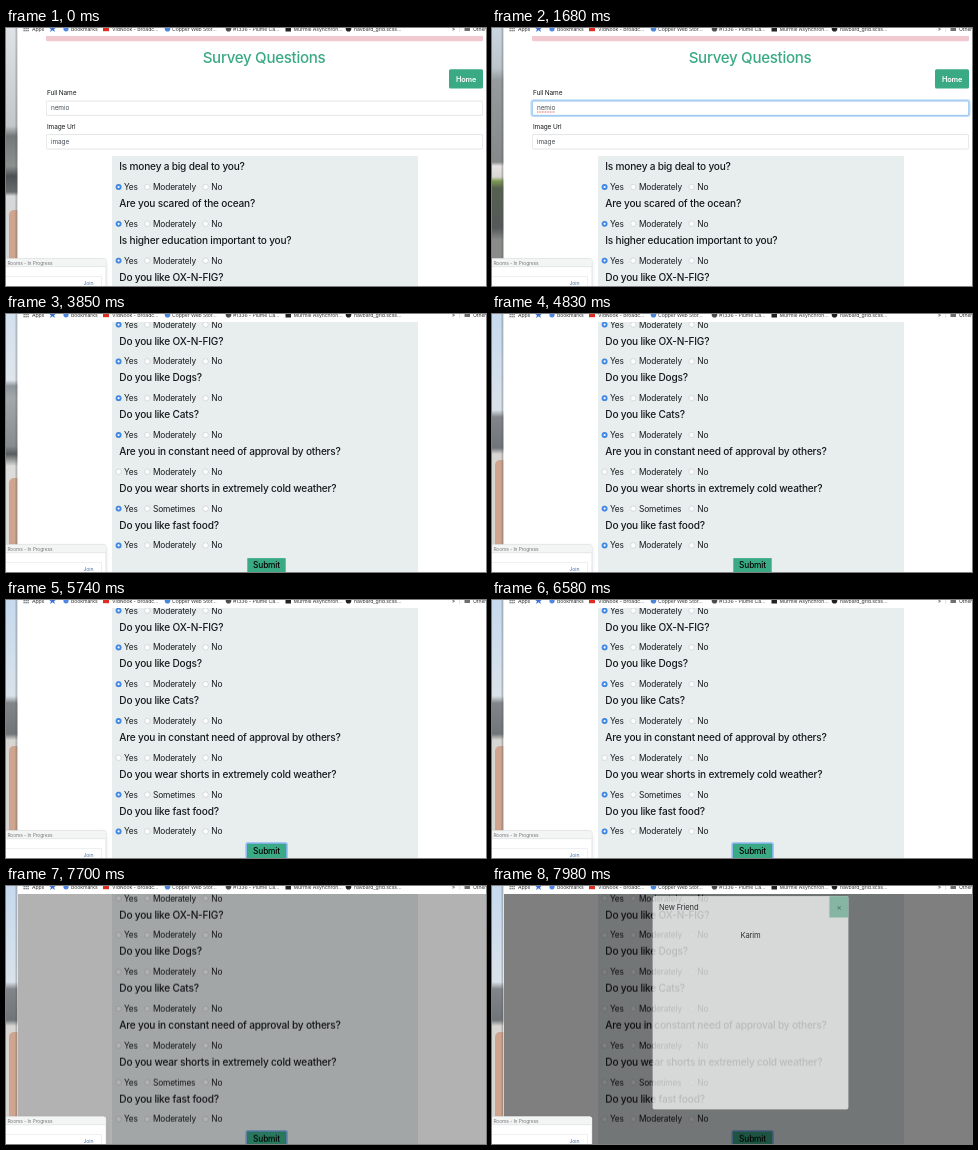
An HTML page for the animation above (8000 ms loop, 480x258 px).

```html
<!DOCTYPE html>
<html lang="en">
<head>
<meta charset="utf-8">
<title>Survey</title>
<style>
html, body { margin: 0; width: 100%; height: 100%; overflow: hidden; background: #fff; }
svg { display: block; width: 480px; height: 258px; font-family: Inter, "Liberation Sans", sans-serif; }
text { letter-spacing: -.02em; }
</style>
</head>
<body>
<svg id="stage" viewBox="0 0 480 258" xmlns="http://www.w3.org/2000/svg">
  <defs>
    <clipPath id="view"><rect x="11.5" y="8" width="469" height="250"/></clipPath>
    <filter id="soft" x="-20%" y="-60%" width="140%" height="220%"><feGaussianBlur stdDeviation="2.5"/></filter>
  </defs>
  <g id="desk"></g>
  <rect x="9.5" width="2" height="258" fill="#555" opacity=".3"/>
  <rect x="11.5" width="469" height="258" fill="#fff"/>
  <g id="bar"></g>
  <g clip-path="url(#view)">
    <g id="page"></g>
    <rect id="shade" x="11" y="8" width="470" height="250" fill="#000"/>
    <g id="modal"></g>
  </g>
  <g id="rooms"></g>
</svg>
<script>
const LOOP = 8000;
const GREEN = '#3aaa85';
const $ = id => document.getElementById(id);

function add(parent, tag, attrs, content) {
  const el = document.createElementNS('http://www.w3.org/2000/svg', tag);
  for (const k in attrs) el.setAttribute(k, attrs[k]);
  if (content) el.textContent = content;
  parent.appendChild(el);
  return el;
}
const group = parent => add(parent, 'g', {});
const rect = (parent, x, y, width, height, fill, more) =>
  add(parent, 'rect', { x, y, width, height, fill, ...more });
const dot = (parent, cx, cy, r, fill, more) =>
  add(parent, 'circle', { cx, cy, r, fill, ...more });
const text = (parent, x, y, size, str, more) =>
  add(parent, 'text', { x, y, 'font-size': size, fill: '#16191c', ...more }, str);

// steps: [time, value, easing to the next step]
function play(el, prop, steps) {
  const frames = steps.map(([t, v, easing = 'step-end']) =>
    ({ offset: t / LOOP, [prop]: v, easing }));
  frames.push({ offset: 1, [prop]: steps[steps.length - 1][1] });
  el.animate(frames, { duration: LOOP, iterations: Infinity });
}
const show = (el, from, to = LOOP) => play(el, 'opacity',
  [[0, from ? 0 : 1], ...(from ? [[from, 1]] : []), ...(to < LOOP ? [[to, 0]] : [])]);

// Strip of wallpaper: soft bands of colour and a plain figure.
function drawDesk() {
  const scenes = [
    { from: 0, to: 1120, body: 182,
      bands: [[0, '#dfe3e7'], [98, '#c3c7ca'], [108, '#747879'], [138, '#8c9190'], [148, '#4c5153'], [164, '#6a6d6e'], [168, '#d5d7d8']] },
    { from: 1120, to: 2240,
      bands: [[0, '#c9d5df'], [40, '#bcc5cc'], [52, '#969b9d'], [134, '#85898a'], [138, '#e6e4e3'], [149, '#d8d6d2'], [153, '#7d9a54'], [160, '#56604e'], [200, '#55595a'], [212, '#8a8c8a']] },
    { from: 2240, to: 4340, body: 164,
      bands: [[0, '#d3e0ee'], [66, '#dfe6ec'], [72, '#8f969b'], [84, '#a3a8ab'], [132, '#878c8e'], [140, '#565c5d'], [152, '#dcdcda']] },
    { from: 4340, to: LOOP, body: 146,
      bands: [[0, '#c6d9ee'], [96, '#d9e2ea'], [103, '#82868a'], [134, '#70757a'], [140, '#d8d6d3']] }
  ];
  scenes.forEach((s, i) => {
    const g = group($('desk'));
    const fade = add(g, 'linearGradient', { id: 'sky' + i, x2: 0, y2: 1 });
    s.bands.forEach(([y, c]) => add(fade, 'stop', { offset: y / 258, 'stop-color': c }));
    rect(g, 0, 0, 12, 258, `url(#sky${i})`);
    if (s.body) rect(g, 3, s.body, 12, 110, '#cfa58f', { rx: 5 });
    show(g, s.from, s.to);
  });
}

function drawBar() {
  const bar = $('bar');
  const label = (x, str) => text(bar, x, 2.7, 5.2, str, { fill: '#303336' });
  for (let i = 0; i < 9; i++)
    rect(bar, 17.5 + i % 3 * 2, -2 + Math.floor(i / 3) * 2, 1.3, 1.3, '#6b6f73');
  label(26, 'Apps');
  add(bar, 'path', { d: 'M46.5-3l1 2.6h2.7l-2.1 1.7 .8 2.6-2.4-1.6-2.4 1.6 .8-2.6-2.1-1.7h2.7z', fill: '#3f72d8' });
  dot(bar, 60, .8, 2.6, '#4e86e6');
  label(65, 'Bookmarks');
  rect(bar, 97, -1.8, 6, 5, '#e02b20');
  label(106, 'VidNook - Broadc…');
  dot(bar, 161.5, .8, 2.8, '#4a86d8');
  label(166, 'Copper Web Stor…');
  dot(bar, 222.5, .8, 2.8, '#4b4d50');
  label(227, '#1336 - Plume Ca…');
  rect(bar, 279.5, -2, 5.5, 5.5, '#222');
  label(287.5, 'Murmle Asynchron…');
  dot(bar, 342.5, .8, 2.8, '#1d1f21');
  label(348, 'navbard_grid.scss…');
  label(446, '»');
  rect(bar, 453.5, -2, .6, 6, '#d0d0d0');
  rect(bar, 458.5, -1, 5.5, 4, '#6b6f73', { rx: .6 });
  label(467, 'Other Bookmarks');
}

function drawField(page, y, label, value) {
  text(page, 41, y - 5.6, 6.5, label);
  rect(page, 40.3, y, 436.4, 14.4, '#fff', { rx: 1.5, stroke: '#ced4da', 'stroke-width': .6 });
  text(page, 45, y + 9.4, 6.5, value, { fill: '#495057' });
}

function drawRow(page, q, i) {
  const y = 138.8 + i * 36.8, mid = y + 20.2;
  text(page, 113.3, y + 3.4, 10.1, q, { 'font-weight': 500 });
  const middle = i === 7 ? 'Sometimes' : 'Moderately';
  [[112.6, 118, 'Yes'], [141.3, 147, middle], [199.6, 205.3, 'No']].forEach(([cx, x, str]) => {
    dot(page, cx, mid, 2.7, '#fff', { stroke: '#b9bdbf', 'stroke-width': .5 });
    text(page, x, mid + 2.9, 8.35, str);
  });
  if (i === 6) return;
  const on = group(page);
  dot(on, 112.6, mid, 2.9, '#3f87e5');
  dot(on, 112.6, mid, 1.1, '#fff');
  show(on, 0, 7490);
}

function drawPage() {
  const page = $('page');
  rect(page, 40, -6, 437, 19.2, '#f3c9d1', { rx: 1.5 });
  text(page, 258, 35.2, 15.1, 'Survey Questions',
    { fill: GREEN, 'font-weight': 500, 'text-anchor': 'middle' });
  rect(page, 443, 41.2, 34, 19.3, GREEN, { rx: 1.5 });
  text(page, 460, 53.5, 7.3, 'Home', { fill: '#fff', 'font-weight': 600, 'text-anchor': 'middle' });

  const glow = rect(page, 39.6, 72.4, 437.8, 15.6, 'none', { rx: 2.2, stroke: '#bfdcf7', 'stroke-width': 2.2 });
  drawField(page, 73, 'Full Name', 'nemio');
  drawField(page, 106.6, 'Image Url', 'image');
  const focus = group(page);
  rect(focus, 40.3, 73, 436.4, 14.4, 'none', { rx: 1.5, stroke: '#80bdf5', 'stroke-width': .7 });
  add(focus, 'path', { d: 'M45 84h18', stroke: '#d9534f', 'stroke-width': .9, 'stroke-dasharray': '1 .6' });
  show(glow, 1120);
  show(focus, 1120);

  rect(page, 106, 128, 306, 380, '#e8eded');
  [
    'Is money a big deal to you?',
    'Are you scared of the ocean?',
    'Is higher education important to you?',
    'Do you like OX-N-FIG?',
    'Do you like Dogs?',
    'Do you like Cats?',
    'Are you in constant need of approval by others?',
    'Do you wear shorts in extremely cold weather?',
    'Do you like fast food?'
  ].forEach((q, i) => drawRow(page, q, i));

  const ring = rect(page, 240.2, 465, 40.8, 16, '#3f8fb0', { rx: 1.5, stroke: '#8fbcf0', 'stroke-width': 1.6 });
  rect(page, 241.3, 466.1, 38.4, 14, GREEN);
  text(page, 260.5, 476, 8.3, 'Submit', { fill: '#000', 'font-weight': 500, 'text-anchor': 'middle' });
  show(ring, 5390);

  const at = y => `translateY(${-y}px)`;
  play(page, 'transform', [
    [0, at(0)], [3290, at(0), 'cubic-bezier(.3,.1,.3,1)'], [3780, at(222)], [7490, at(220.3)]
  ]);
}

function drawModal() {
  const modal = $('modal');
  rect(modal, 160.5, 20, 196, 213.5, '#fff', { rx: 2, stroke: '#000', 'stroke-opacity': .2, 'stroke-width': .4 });
  text(modal, 167, 34, 7.6, 'New Friend');
  rect(modal, 337.4, 20.2, 19, 21.3, '#8fcfb6');
  text(modal, 347, 34, 8, '×', { fill: '#3f6b5c', 'text-anchor': 'middle' });
  text(modal, 258.5, 61.8, 7.6, 'Karim', { 'text-anchor': 'middle' });
  play(modal, 'opacity', [[0, 0], [7910, .27], [7980, .72]]);
  play(modal, 'transform', [[0, 'translateY(-20px)'], [7910, 'translateY(-16px)'], [7980, 'translateY(-10px)']]);
  play($('shade'), 'opacity', [[0, 0], [7700, .3], [7770, .45], [7840, .5]]);
}

function drawRooms() {
  const g = $('rooms');
  rect(g, -10, 233, 109, 40, '#000', { opacity: .16, filter: 'url(#soft)' });
  rect(g, -10, 230.5, 110, 40, '#fff', { rx: 2.5, stroke: '#c6cacc', 'stroke-width': .5 });
  rect(g, -10, 230.8, 109.7, 8, '#f3f4f4', { rx: 2 });
  rect(g, 0, 238.6, 99.8, .5, '#cfd2d4');
  rect(g, 0, 248.2, 95, .5, '#dcdfe1');
  rect(g, 95, 248.2, .5, 10, '#dcdfe1');
  text(g, 46.5, 236.6, 4.9, 'Breakout Rooms - In Progress', { fill: '#77797b', 'text-anchor': 'end' });
  text(g, 77.5, 257, 5.2, 'Join', { fill: '#4a6fa0' });
}

drawDesk();
drawBar();
drawPage();
drawModal();
drawRooms();
</script>
</body>
</html>
```
